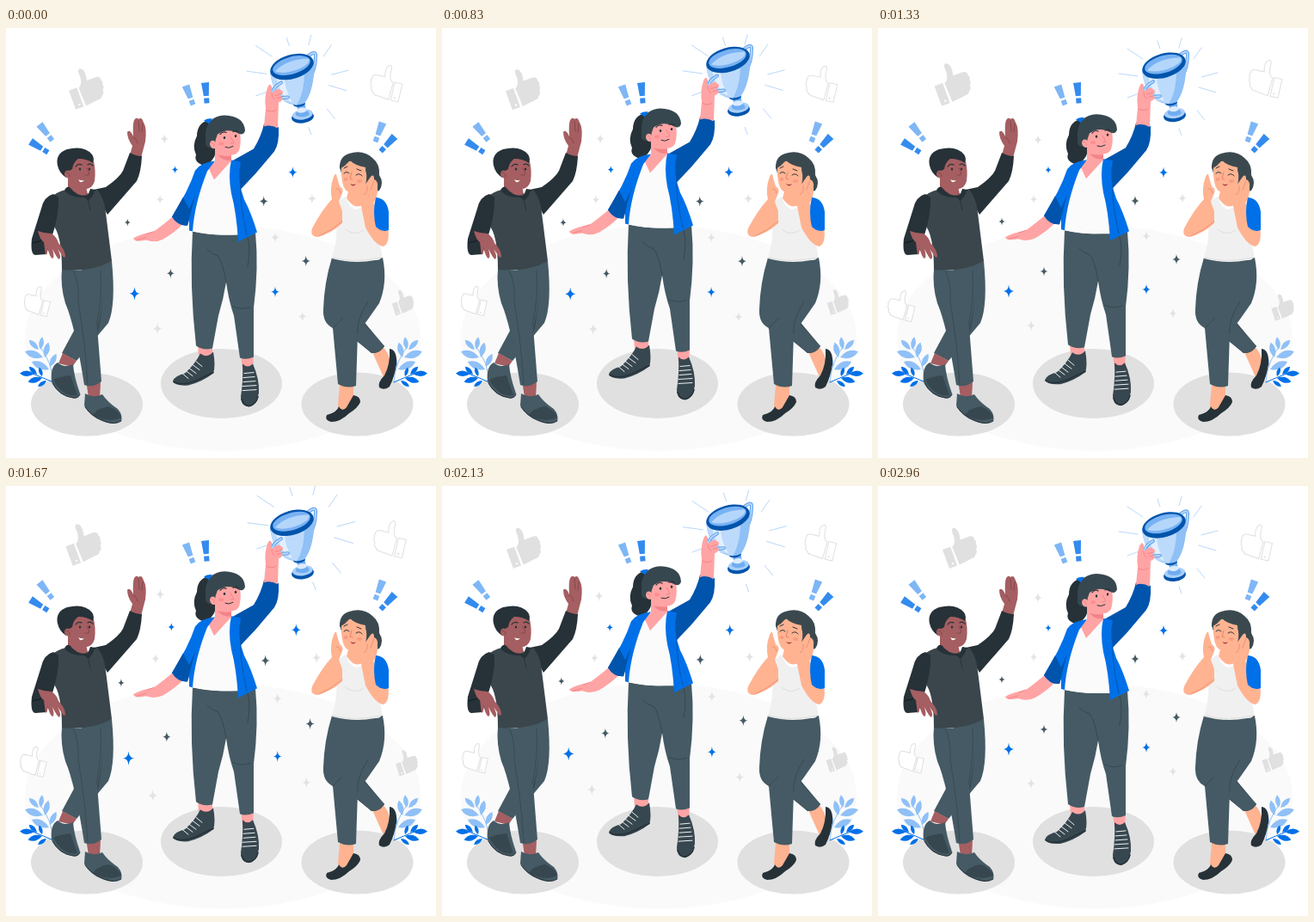
These frames come from a looping animation (500x500 px, 3000 ms). An HTML page:

```html
<!DOCTYPE html>
<html lang="en">
<head>
<meta charset="utf-8">
<title>Celebration</title>
<style>
html, body { margin: 0; width: 100%; height: 100%; overflow: hidden; background: #fff; }
svg { display: block; width: 100%; height: 100%; }
</style>
</head>
<body>
<svg id="stage" viewBox="0 0 500 500"></svg>
<script>
const BLUE = '#0070e8', NAVY = '#0054ac', SKY = '#8fc0f7', GREY = '#e0e0e0';
const SLATE = '#455a64', DARK = '#37474f', INK = '#263238';
const PINK = '#ffa4a4', PEACH = '#ffb391', BROWN = '#a55e61';

const fill = (color, ...ds) => ds.map(d => `<path d="${d}" fill="${color}"/>`).join('');
const line = (color, w, d) =>
  `<path d="${d}" fill="none" stroke="${color}" stroke-width="${w}" stroke-linecap="round" stroke-linejoin="round"/>`;
const oval = (x, y, rx, ry, color, turn = 0) =>
  `<ellipse cx="${x}" cy="${y}" rx="${rx}" ry="${ry}" fill="${color}" transform="rotate(${turn} ${x} ${y})"/>`;
const place = (x, y, turn, body, sx = 1, sy = sx) =>
  `<g transform="translate(${x} ${y}) rotate(${turn}) scale(${sx} ${sy})">${body}</g>`;

// Repeated ornaments
function thumb(x, y, turn, size, flip, solid) {
  const d = 'M0 0H10V24H0ZM12 1C16 0 19-7 18-15Q18-20 21-20Q26-18 25-9L24-4H36Q41-3 40 1Q42 4 40 7Q41 11 38 13Q39 17 35 19Q34 22 30 22L13 24Z';
  const look = solid ? `fill="${GREY}"` : `fill="#fff" stroke="${GREY}" stroke-width="${1 / size}"`;
  return place(x, y, turn, `<path d="${d}" ${look}/>` + oval(6, 20, 1.2, 1.2, solid ? '#fff' : GREY), flip ? -size : size, size);
}
const star = (x, y, r, color) =>
  place(x, y, 0, fill(color, 'M0-1Q.07-.07.8 0Q.07.07 0 1Q-.07.07-.8 0Q-.07-.07 0-1Z'), r);
const exclaim = (x, y, turn, color) =>
  place(x, y, turn, fill(color, 'M-4.5 0H4.5L3 15.5H-3ZM-3 18H3V24H-3Z'));
const leaf = (x, y, turn, size, color) =>
  place(x, y, turn, fill(color, 'M0 0Q-.38-.55 0-1Q.38-.55 0 0Z'), size);

function plant() {
  const light = [[40, 374, 8, 15], [38, 374, -45, 16], [45, 383, 14, 18], [43, 383, -72, 22],
    [51, 394, 26, 17], [50, 397, -66, 22]];
  const dark = [[33, 402, -88, 17], [36, 403, -45, 13], [42, 405, -18, 11],
    [42, 407, -105, 17], [47, 410, -125, 12]];
  return line(SKY, 1, 'M55 411Q53 388 40 371') + light.map(p => leaf(...p, SKY)).join('') +
    line(BLUE, 1, 'M55 412Q44 407 31 402') + dark.map(p => leaf(...p, BLUE)).join('');
}

function sparkles() {
  const stars = [
    ['#e3e3e3', [[186, 130, 6], [181, 199, 5.5], [178, 346, 6.5], [354, 198, 6], [312, 242, 6], [343, 332, 6]]],
    [BLUE, [[198, 165, 4.5], [152, 306, 7.5], [332, 168, 6.5], [312, 304, 6]]],
    [SLATE, [[144, 225, 4.5], [193, 283, 5.5], [299, 201, 6], [347, 269, 6]]]
  ];
  const rays = 'M325 15L328 24M353 12L350 23M376 23L367 36M395 52L376 57M373 69L393 75M371 96L380 107' +
    'M350 117L353 125M290 24L308 36M280 53L302 56M290 81L304 76';
  return line('#9cc7f8', .7, rays) +
    stars.map(([color, list]) => list.map(p => star(...p, color)).join('')).join('');
}

function man() {
  return fill(SLATE, 'M88 280L123 271Q128 322 119 343L82 387L65 378Q80 350 91 330Z')
    + fill(DARK, 'M107 285L113 280Q114 325 106 356L104 345Z')
    + fill(BROWN, 'M66 378L82 387L77 394L61 390Z', 'M94 416L110 412L109 430H96Z')
    + fill(SLATE, 'M65 280Q95 284 115 277Q113 328 106 348L111 411Q101 419 91 415Q80 345 69 320Q63 300 65 280Z')
    + line(DARK, .8, 'M78 282Q85 295 84 318Q92 365 95 414M110 282Q112 315 105 346')
    + fill(SLATE, 'M60 389Q68 396 78 391Q79 405 86 425Q85 432 77 430Q60 427 53 411Q51 394 60 389Z',
      'M92 425Q101 431 112 426Q118 435 130 443Q136 450 134 457Q125 463 112 457Q98 452 91 439Z')
    + fill(DARK, 'M55 409Q63 405 75 404L83 427Q66 430 55 409Z', 'M101 450Q106 442 120 440Q133 446 134 453Q120 460 101 450Z')
    + line(INK, 1, 'M54 413Q62 428 78 430Q84 431 86 426M92 441Q100 452 114 457Q127 462 134 457')
    + fill(BROWN, 'M144 148L147 137Q141 129 141 121Q144 117 148 126Q147 112 149 107Q152 103 154 106Q158 103 160 110Q164 116 162 132L157 151Z')
    + line('#7d4245', .8, 'M154 108L155 120M159 111L158 121M148 127Q152 128 153 134')
    + fill(INK, 'M102 188L116 185Q132 174 136 166L144 145Q151 149 158 149Q157 168 152 178L118 217Z')
    + fill('#3a464c', 'M52 197Q60 190 70 188L98 193L106 188Q115 199 116 215L123 271Q100 284 65 281Q65 240 54 228Z')
    + fill(BROWN, 'M72 170L92 180L95 193Q86 199 72 188Z')
    + fill(INK, 'M68 189Q70 184 74 185Q82 196 95 195L98 187L104 188L100 196L96 201L91 197Q76 198 68 189Z')
    + line(INK, .9, 'M95 199L98 212')
    + fill(BROWN, 'M68 158Q68 149 84 149L101 151Q105 165 103 178Q100 189 88 187Q78 185 73 178Z')
    + fill(INK, 'M60 160Q57 146 71 141Q91 136 100 147Q103 151 101 157Q94 152 84 152Q78 156 77 164L72 167L70 174Q62 169 60 160Z')
    + oval(72, 170, 4, 4.5, BROWN, -20) + line('#7d4245', .8, 'M70 168Q74 168 74 173M94 163Q98 170 96 171L92 171')
    + oval(86, 164, 1.2, 1.6, INK) + oval(97, 164, 1.2, 1.6, INK)
    + line(INK, 1.2, 'M81 161Q84 157 88 159M95 159Q98 157 101 160')
    + fill('#fff', 'M84 176Q87 178 91 177Q88 180 86 179Z')
    + fill(INK, 'M55 193Q44 196 41 210L30 245Q28 263 34 264L47 263L52 247Q62 218 61 197Z')
    + line('#10191d', 1, 'M31 250Q40 249 48 243')
    + fill(BROWN, 'M37 236Q45 239 53 239Q59 243 61 250Q69 258 69 266Q67 268 65 264L60 257Q65 266 62 269Q60 269 54 257Q57 267 54 268Q51 267 48 255Q49 263 46 264L44 249Q40 247 37 236Z');
}

function friend() {
  return fill(PEACH, 'M426 377L438 370Q447 380 447 393L439 406Z', 'M388 415L404 416V430Q400 444 388 447L386 438Z')
    + fill(DARK, 'M409 333L440 370Q434 379 425 378L403 360Z')
    + fill(SLATE, 'M411 338L440 370Q434 379 425 378L407 362Z')
    + fill(SLATE, 'M379 267Q405 275 438 267Q444 296 434 320Q421 339 409 355L407 416Q397 420 386 414L380 349Q368 343 369 327Q370 296 379 267Z')
    + line(DARK, .9, 'M409 355Q407 340 421 318M380 349L391 338')
    + fill(INK, 'M446 373Q455 374 454 391Q452 405 446 417Q440 422 434 418Q432 412 440 404Q447 391 446 373Z',
      'M404 427Q412 428 412 435Q409 442 399 448Q389 458 378 458Q370 456 373 450Q385 447 387 440Q391 447 396 441Z')
    + fill('#3b494f', 'M388 162Q388 149 399 146Q415 141 426 151Q435 158 434 171Q440 180 434 189Q428 192 417 188L394 182Z')
    + fill(PEACH, 'M400 182L417 182L420 200Q408 216 396 198Z')
    + fill('#f0f0f0', 'M385 203L395 196Q399 210 408 211Q417 209 419 197L432 200Q430 230 437 262Q438 271 429 270Q405 275 379 268Q386 245 384 224Z')
    + line('#dedede', 1, 'M395 234Q405 243 416 235M436 267Q405 274 380 267')
    + fill(PEACH, 'M390 160Q399 151 417 157Q421 172 418 183Q410 193 399 191Q389 188 390 160Z')
    + fill('#3b494f', 'M388 164Q389 150 402 147L420 152Q426 160 422 176Q418 169 418 162Q406 160 400 154Q395 160 388 164Z')
    + line(INK, 1, 'M393 169Q396 166 399 169M407 171Q411 168 414 172M393 163L397 161M408 164L413 166')
    + line('#e57c67', .9, 'M402 168L400 175L403 176') + fill('#a93742', 'M400 181Q404 183 407 181Q404 186 400 181Z')
    + oval(395, 176, 2.5, 2, '#f99b83') + oval(411, 178, 3, 2, '#f99b83')
    + fill(PEACH, 'M379 199Q376 186 381 173Q384 166 385 174L388 184Q393 187 391 192L387 202L391 213V227Q378 239 362 243Q353 242 356 233Q367 212 379 199Z',
      'M412 202Q410 191 417 183L424 173Q428 169 428 176Q433 178 432 185Q433 195 427 204L444 231Q447 250 439 254Q429 253 418 232Z')
    + line('#e88b70', .8, 'M384 187Q388 186 389 192M420 184Q421 192 416 194M428 177L424 188M364 242Q378 236 391 225')
    + fill(BLUE, 'M430 197Q443 198 445 214L445 235Q437 238 430 231Q426 214 430 197Z');
}

function trophy() {
  return line('#5ba0ee', 4, 'M350 34Q360 26 360 32Q360 49 353 59')
    + line('#b8d7fa', 2, 'M350 34Q360 26 360 32Q360 49 353 59')
    + oval(345, 104, 13, 7, NAVY, -8) + oval(345, 101, 12, 6, '#a9cff9', -8)
    + fill('#70adf1', 'M335 87L347 86L349 96Q354 99 352 102Q344 106 337 102Q336 99 340 96Z')
    + oval(344, 96, 6, 3, '#dcecfd', -8) + oval(341, 89, 7, 3, NAVY, -8)
    + fill('#8fc0f6', 'M307 50Q309 74 324 86Q336 93 347 88Q358 75 359 40Z')
    + fill('#bcdafb', 'M307 50Q309 74 324 86L338 90Q347 76 347 50Z')
    + fill('#e1effe', 'M314 56Q316 72 327 84L333 87Q324 72 324 58Z')
    + oval(332.5, 45.5, 26, 14, NAVY, -16) + oval(332, 44, 22.5, 10, '#78b2f3', -16)
    + fill('#b4d6fb', 'M313 51Q325 37 352 36Q355 41 343 47Q325 55 313 51Z')
    + line('#5ba0ee', 4, 'M320 64Q309 70 310 77Q315 83 328 81')
    + line('#b8d7fa', 2, 'M320 64Q309 70 310 77Q315 83 328 81');
}

function winner() {
  const laces = 'M205 402L212 408M209 399L217 405M213 396L221 402M217 392L225 398M221 388L228 394' +
    'M277 402L288 401M276 407L289 406M276 412L290 411M275 417L291 416M275 422L291 421';
  return fill(PINK, 'M223 369L240 371L240 385L224 382Z', 'M273 381H288L287 397H275Z')
    + fill(DARK, 'M226 379Q234 385 241 377Q244 394 241 402Q228 412 212 416Q196 417 194 411Q196 405 208 402Q220 391 226 379Z',
      'M275 391Q281 397 287 391Q295 409 294 425Q290 440 282 441Q273 440 273 429Q276 410 275 391Z')
    + line(INK, 1.6, 'M195 412Q204 417 220 411L241 401M274 432Q276 440 283 440Q291 438 293 429')
    + line('#f1f1f1', 1, laces)
    + fill(SLATE, 'M217 237Q243 243 270 240L290 238Q294 280 288 326L288 383Q279 387 272 384L265 335Q259 318 256 296Q253 315 247 335L240 373Q230 376 221 370Q213 300 217 237Z')
    + line(DARK, 1, 'M256 296Q252 272 246 265Q240 264 234 258M264 324Q273 329 284 325M281 244Q285 256 281 278')
    + fill(INK, 'M238 107Q222 110 222 126Q216 137 221 148Q218 156 229 160Q241 158 244 145Z')
    + fill(PINK, 'M196 218Q182 230 172 237Q156 240 148 245Q149 250 163 247Q173 251 183 246Q198 237 206 228Z')
    + line('#ef7d82', .8, 'M172 237L164 240M152 247L163 244')
    + fill('#fbfbfb', 'M229 163L243 157L262 154Q274 200 270 241Q240 242 217 237Q220 200 219 185Z')
    + fill(PINK, 'M243 140L262 146L262 155L242 177L234 160L243 156Z')
    + fill('#f18489', 'M246 148Q254 150 262 149V154Q253 156 246 148Z')
    + fill(BLUE, 'M243 155Q226 157 220 166Q212 190 193 220Q200 231 211 230L213 224V236L217 237Q219 205 234 167Z')
    + fill(NAVY, 'M206 197L193 220Q200 231 211 230L220 195L213 211Z')
    + fill(NAVY, 'M263 155L288 141Q297 126 300 112Q309 111 317 116Q318 135 312 144L290 170L272 189Z')
    + fill(BLUE, 'M262 154L273 156Q268 177 277 200Q285 215 292 238L270 249Q268 215 262 193Q258 171 262 154Z')
    + line(NAVY, .9, 'M273 175Q271 203 280 241')
    + fill(PINK, 'M242 123Q258 113 272 122Q274 133 271 143Q267 150 257 148Q246 147 242 139Z')
    + fill(DARK, 'M232 123Q234 103 254 102Q277 103 278 120Q276 126 270 123Q258 116 246 124Q243 130 243 137Q236 143 232 136Z')
    + fill(BLUE, 'M230 108Q235 105 240 106L236 112Z')
    + oval(241, 136, 3.8, 4.8, PINK, -20) + line('#ef7d82', .8, 'M239 134Q242 134 242 138M261 127L265 134L261 135')
    + oval(254, 128, 1.2, 1.6, INK) + oval(267, 126, 1.2, 1.6, INK)
    + line(INK, 1.2, 'M249 124Q252 120 256 122M264 121Q267 119 270 121')
    + line(INK, 1, 'M255 139Q259 141 264 138') + oval(250, 135, 3, 2, '#ff8d90')
    + trophy()
    + fill(PINK, 'M300 115L302 94Q300 82 304 70Q307 63 309 69L309 76Q316 69 320 73Q325 75 319 79L322 82Q321 86 317 87L316 117Q307 112 300 115Z')
    + line('#ef7d82', .8, 'M309 76Q309 82 313 84M313 79L320 77M315 82L320 81M303 96Q309 99 314 96');
}

const mirrored = `<g transform="translate(506 0) scale(-1 1)">${plant()}</g>`;
document.getElementById('stage').innerHTML =
  oval(252, 360.5, 230, 131, '#fafafa')
  + `<g id="thumbs">${thumb(75, 74, -20, .97, false, true)}${thumb(458.5, 66.5, 13, .88, true, false)}`
  + `${thumb(53.5, 317, 13, .72, true, false)}${thumb(446.5, 319, -18, .61, false, true)}</g>`
  + oval(94, 437.5, 65, 37, GREY) + oval(250.5, 413.5, 70.5, 40.5, GREY) + oval(408.5, 437.5, 65, 37, GREY)
  + exclaim(28.5, 132, -58, '#348bee') + exclaim(39, 112, -38, '#7fb6f5')
  + exclaim(209, 67, -21, '#7fb6f5') + exclaim(231.5, 63.5, -5, '#348bee')
  + exclaim(438, 110, 21, '#7fb6f5') + exclaim(452, 126, 43, '#348bee')
  + plant() + mirrored
  + `<g id="sparkles">${sparkles()}</g>`
  + man() + friend() + `<g id="winner">${winner()}</g>`;

const [thumbs, sparks, hero] = ['thumbs', 'sparkles', 'winner'].map(id => document.getElementById(id));

// Double pulse: two linear peaks of 1.1 per cycle
function beat(p) {
  const keys = [[0, 0], [.1, .1], [.3, 0], [.4, 0], [.5, .1], [.6, 0], [1, 0]];
  const i = keys.findIndex(k => p < k[0]);
  const [a, u] = keys[i - 1], [b, v] = keys[i];
  return 1 + u + (v - u) * (p - a) / (b - a);
}
const zoom = (node, x, y, s) =>
  node.setAttribute('transform', `translate(${x} ${y}) scale(${s}) translate(${-x} ${-y})`);

function draw() {
  const t = performance.now() + 32;
  const slow = t % 3000 / 3000, quick = t % 1500 / 1500;
  zoom(thumbs, 248, 192, beat(slow));
  zoom(sparks, 267, 178, beat(quick));
  hero.setAttribute('transform', `translate(0 ${-10 * (1 - Math.abs(1 - 2 * quick))})`);
  requestAnimationFrame(draw);
}
draw();
</script>
</body>
</html>
```
